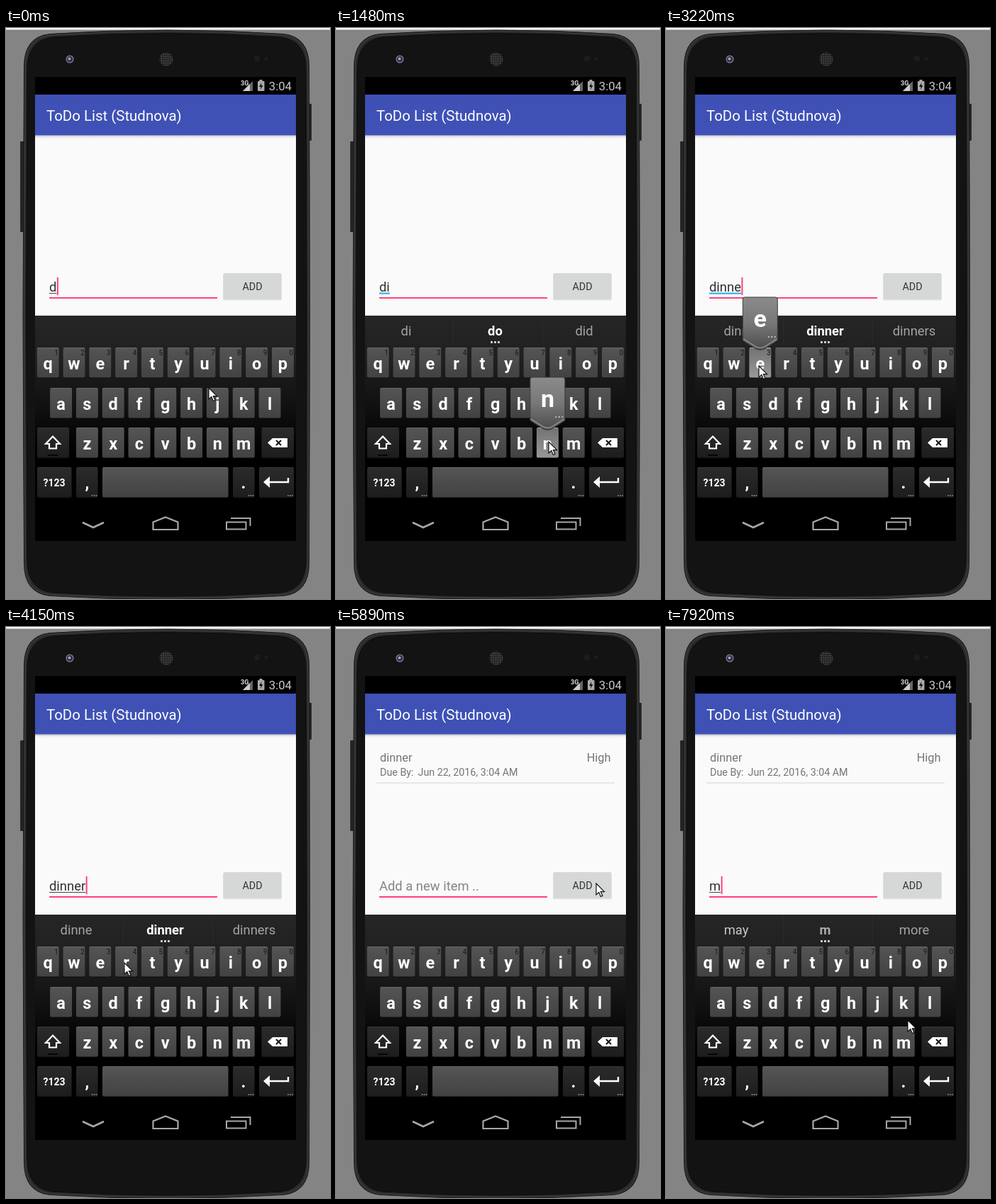
Write an HTML page with a canvas that moves like this. It is 457 px wide and 806 px high and loops after 8000 ms.

```html
<!DOCTYPE html>
<html lang="en">
<head>
<meta charset="utf-8">
<title>ToDo list demo</title>
<style>
  html, body { margin: 0; width: 100%; height: 100%; overflow: hidden; background: #848484; }
  canvas { display: block; width: 457px; height: 806px; }
</style>
</head>
<body>
<canvas id="stage"></canvas>
<script>
const W = 457, H = 806, LOOP = 8000;
const PINK = '#ff4081', FONT = 'Roboto, sans-serif';
const canvas = document.getElementById('stage');
const dpr = window.devicePixelRatio || 1;
canvas.width = W * dpr;
canvas.height = H * dpr;
const c = canvas.getContext('2d');
c.scale(dpr, dpr);

// ---------- timeline ----------
// The pointer is redrawn in bursts: [first, last, count]
const bursts = [[120, 1090, 8], [1210, 1790, 5], [2090, 3070, 8], [3220, 4150, 8], [4270, 4940, 6],
  [5210, 5490, 3], [5890, 5890, 1], [6170, 6410, 3], [6840, 7770, 8], [7920, 7920, 1]];
const ticks = [0];
for (const [from, to, n] of bursts)
  for (let i = 0; i < n; i++) ticks.push(n > 1 ? from + (to - from) * i / (n - 1) : from);

const typing = [[0, 'd'], [675, 'di'], [1640, 'din'], [2220, 'dinn'], [3220, 'dinne'], [4020, 'dinner'], [5350, ''], [7640, 'm']];
// time, words, whether the middle word will replace the typed one
const hints = [[0, null], [815, ['di', 'do', 'did'], true], [1790, ['dinner', 'din', 'fun'], false],
  [2370, ['dinn', 'dinner', 'dinners'], true], [3350, ['dinne', 'dinner', 'dinners'], true],
  [4270, ['dinners', 'dinner', 'dinnertime'], false], [5350, null], [7920, ['may', 'm', 'more'], false]];
const presses = [[535, 675, 'i'], [1355, 1640, 'n'], [2090, 2220, 'n'], [3070, 3350, 'e'], [3885, 4150, 'r'], [7370, 7640, 'm']];
const pointer = [[0, 286, 508], [400, 314, 478], [800, 314, 478], [1090, 301, 563], [1210, 300, 584], [2450, 300, 584],
  [2950, 131, 477], [3460, 131, 477], [3740, 167, 474], [4270, 167, 474], [4900, 367, 362], [6060, 367, 362],
  [6410, 346, 531], [6720, 346, 531], [7200, 333, 593], [7780, 333, 593], [7900, 341, 555]];

const latest = (list, t) => list.filter(e => (e[0] ?? e) <= t).pop();

function pointerAt(t) {
  const a = latest(pointer, t), b = pointer[pointer.indexOf(a) + 1] || a;
  const k = a === b ? 0 : (t - a[0]) / (b[0] - a[0]), s = k * k * (3 - 2 * k);
  return [a[1] + (b[1] - a[1]) * s, a[2] + (b[2] - a[2]) * s];
}

// ---------- drawing helpers ----------
const sp = n => n * 368 / 360;   // screen is 360 units wide, drawn over 368 px

function text(str, x, y, size, color, align = 'left', weight = 400) {
  c.font = `${weight} ${size}px ${FONT}`;
  c.fillStyle = color;
  c.textAlign = align;
  c.fillText(str, x, y);
}
function rect(x, y, w, h, fill, r = 0) {
  c.fillStyle = fill;
  c.beginPath();
  c.roundRect(x, y, w, h, r);
  c.fill();
}
function disc(x, y, r, fill) {
  c.fillStyle = fill;
  c.beginPath();
  c.arc(x, y, r, 0, 7);
  c.fill();
}
function shape(d, fill, stroke, width = 1) {
  const p = new Path2D(d);
  if (fill) { c.fillStyle = fill; c.fill(p); }
  if (stroke) { c.strokeStyle = stroke; c.lineWidth = width; c.stroke(p); }
}
function vertical(y0, y1, ...colors) {
  const g = c.createLinearGradient(0, y0, 0, y1);
  colors.forEach((color, i) => g.addColorStop(i / (colors.length - 1), color));
  return g;
}
function dots(x, y, gap, size, fill) {
  for (let i = -1; i <= 1; i++) rect(x + i * gap - size / 2, y - size / 2, size, size, fill);
}

// ---------- phone ----------
function body(inset, fill, stroke) {
  const l = 25.5 + inset, r = 427.5 - inset, t = 8.5 + inset, b = 801.5 - inset;
  shape(`M${l} ${t + 46}Q${l} ${t + 4} ${l + 36} ${t}Q227 ${t - 11} ${r - 36} ${t}Q${r} ${t + 4} ${r} ${t + 46}
    Q${r + 2} 405 ${r} ${b - 46}Q${r} ${b - 4} ${r - 36} ${b}Q227 ${b + 10} ${l + 36} ${b}
    Q${l} ${b - 4} ${l} ${b - 46}Q${l - 3} 405 ${l} ${t + 46}Z`, fill, stroke);
}
function phone() {
  rect(0, 0, W, H, '#848484');
  rect(0, 0, W, 2.5, '#f4f7f6');
  rect(20, 160, 6, 128, '#252525', 1);
  rect(426, 107, 5, 52, '#252525', 1);
  body(0, '#2a2a2a', '#191919');
  body(1.5, null, '#414141');
  body(4.5, '#131313', '#0c0c0c');
  disc(90, 44, 5.5, '#85858f');
  disc(90, 44, 4.3, '#2c2c48');
  disc(89.5, 43.5, 2, '#a0a0c4');
  disc(226, 44, 9.5, '#3c3c3c');
  for (let y = -8; y <= 8; y += 3)
    for (let x = -8; x <= 8; x += 3)
      if (Math.hypot(x, y) < 9) disc(226 + x, 44 + y, 0.9, '#101010');
  disc(354, 43, 4, '#1d1d1d');
  disc(367, 43, 2.5, '#1d1d1d');
  rect(41, 69, 368, 655, '#000');
}
function statusBar() {
  text('3G', 331, 81, 9, '#ddd', 'left', 700);
  shape('M348 75V89H334Z', '#666');
  shape('M342 81V89H334Z', '#ccc');
  shape('M341 89V82L344 79V89Z', '#ccc');
  rect(357.5, 73, 4, 3, '#aaa');
  rect(355, 75, 9.5, 14, '#aaa', 1);
  shape('M360.5 77L357 83H359.5L359 87L362.5 81H360Z', '#111');
  text('3:04', 403, 88, 16.7, '#c9c9c9', 'right');
}
function navBar() {
  shape('M108 698L123 705L138 698', null, '#a8a8a8', 2.6);
  shape('M207.5 708V697.5L225 690.5L242.5 697.5V708Z', null, '#a8a8a8', 2.2);
  shape('M311 697.5H338.5V707.5H311ZM317 692H344.5V703', null, '#a8a8a8', 2);
}

// ---------- app ----------
function app(t) {
  rect(41, 94, 368, 312, '#fafafa');
  rect(41, 151.5, 368, 6, vertical(151.5, 157.5, '#c4c4c4', '#f0f0f0', '#fafafa'));
  rect(41, 94, 368, 57.5, '#3f51b5');
  text('ToDo List (Studnova)', 57, 131, sp(20), '#fff');

  if (t >= 5350) {
    text('dinner', 62, 190, sp(16), '#757575');
    text('High', 387.5, 190, sp(16), '#757575', 'right');
    text('Due By:', 62, 210, sp(14), '#757575');
    text('Jun 22, 2016, 3:04 AM', 115.5, 210, sp(14), '#757575');
    rect(57, 219.5, 336, 1.2, '#dcdcdc');
  }

  const [since, typed] = latest(typing, t), [, words, replaces] = latest(hints, t);
  text(typed || 'Add a new item ..', 61, 371.5, sp(18), typed ? '#303030' : '#858585');
  const end = 61 + (typed ? c.measureText(typed).width : 0);
  if (replaces && words[1] !== typed) rect(61, 373.5, end - 61, 2.2, '#33b5e5');
  else if (typed) rect(61, 374, end - 61, 1, '#444');
  rect(61, 380, 237, 2, PINK);
  if ((t - since) % 1000 < 500) rect(end + 0.5, 352, 2, 25, PINK);

  rect(306, 347, 83, 37.5, '#e6e6e6', 2);
  rect(306.5, 346, 82, 37, t >= 5210 && t < 5490 ? '#c4c5c5' : '#d6d7d7', 2);
  text('ADD', 347.5, 370, sp(14), '#333', 'center');
}

// ---------- keyboard ----------
const PITCH = 36.8;
const rows = [['qwertyuiop', 59.2, 451], ['asdfghjkl', 77.6, 508], ['zxcvbnm', 114.4, 564]];

function key(x, y, w, pale, pressed) {
  const [a, b] = pressed ? ['#727272', '#989898'] : pale ? ['#555', '#424242'] : ['#2b2b2b', '#1d1d1d'];
  rect(x, y + 1, w, 42.5, '#0a0a0a', 2);
  rect(x, y, w, 42.5, vertical(y, y + 42, a, b), 2);
  rect(x + 1, y, w - 2, 1, pressed ? '#aaa' : pale ? '#686868' : '#383838');
}
function suggestions(t) {
  const [, words, replaces] = latest(hints, t);
  if (!words) return;
  rect(165, 407, 1, 40, '#2b2b2b');
  rect(291, 407, 1, 40, '#2b2b2b');
  text(words[0], 99, 433.5, sp(18), replaces ? '#a4a4a4' : '#c8c8c8', 'center');
  text(words[1], 224.5, 433.5, sp(18), replaces || words[1] === 'dinner' ? '#fff' : '#acacac', 'center', 700);
  text(words[2], 350, 433.5, sp(18), '#a4a4a4', 'center');
  dots(224.5, 443.5, 5, 2.8, '#ddd');
}
function popup(letter, x, y) {
  const l = x - 24.5, r = x + 24.5, top = y - 71;
  shape(`M${l} ${top + 3}Q${l} ${top} ${l + 3} ${top}H${r - 3}Q${r} ${top} ${r} ${top + 3}V${top + 61}
    L${x + 6} ${top + 73}Q${x} ${top + 76} ${x - 6} ${top + 73}L${l} ${top + 61}Z`,
    vertical(top, top + 75, '#8b8b8b', '#777', '#4a4a4a'), '#3c3c3c');
  shape(`M${l + 1} ${top + 59}L${x - 6} ${top + 70}Q${x} ${top + 73} ${x + 6} ${top + 70}L${r - 1} ${top + 59}`, null, '#8c8c8c', 1.5);
  text(letter, x, top + 42, 34, '#fff', 'center', 700);
  dots(x + 16.5, top + 56, 4.5, 2, '#bbb');
}
function keyboard(t) {
  rect(41, 406, 368, 258, vertical(406, 664, '#262626', '#1f1f1f', '#101010', '#000', '#000'));
  suggestions(t);

  const press = presses.find(p => t >= p[0] && t < p[1]);
  let bubble = null;
  rows.forEach(([letters, x0, y], row) => [...letters].forEach((letter, i) => {
    const x = x0 + i * PITCH, pressed = press && press[2] === letter;
    key(x - 15.5, y, 31, true, pressed);
    if (row === 0) text((i + 1) % 10, x + 12, y + 10.5, 10, '#242424', 'center', 500);
    text(letter, x, y + 31, 23.5, '#fff', 'center', 700);
    if (pressed) bubble = [letter, x, y];
  }));

  key(44, 564, 45, false);
  shape('M66 576.5L76 587H71V593.5H61V587H56Z', null, '#fff', 2.2);
  rect(59, 602, 14, 2, '#050505');
  key(360.5, 564, 45.5, false);
  shape('M369 585.5L376 579H397V592H376Z', '#fff');
  shape('M381 582L388 589M388 582L381 589', null, '#111', 2);

  key(44, 620, 48.5, false);
  text('?123', 68, 647, 14, '#fff', 'center', 700);
  key(99, 620, 30.5, false);
  text(',', 114.4, 650, 23.5, '#fff', 'center', 700);
  dots(124.5, 660, 3, 1.6, '#999');
  key(136, 620, 177.5, true);
  key(320, 620, 30.5, false);
  text('.', 335, 650, 23.5, '#fff', 'center', 700);
  dots(345.5, 660, 3, 1.6, '#999');
  key(357, 620, 49, false);
  shape('M363 641L372 633V649Z', '#fff');
  shape('M371 641H398V635', null, '#fff', 2.4);
  dots(401, 660, 3, 1.6, '#999');

  if (bubble) popup(...bubble);
}

function arrow(t) {
  const [x, y] = pointerAt(latest(ticks, t));
  c.save();
  c.translate(Math.round(x), Math.round(y));
  shape('M0 0V16L3.8 12.6L6.4 18.5L9 17.4L6.4 11.6H11.5Z', '#fff', '#111', 1.2);
  c.restore();
}

function draw(t) {
  phone();
  statusBar();
  app(t);
  keyboard(t);
  navBar();
  arrow(t);
}

function frame() {
  draw(performance.now() % LOOP);
  requestAnimationFrame(frame);
}
frame();
</script>
</body>
</html>
```
